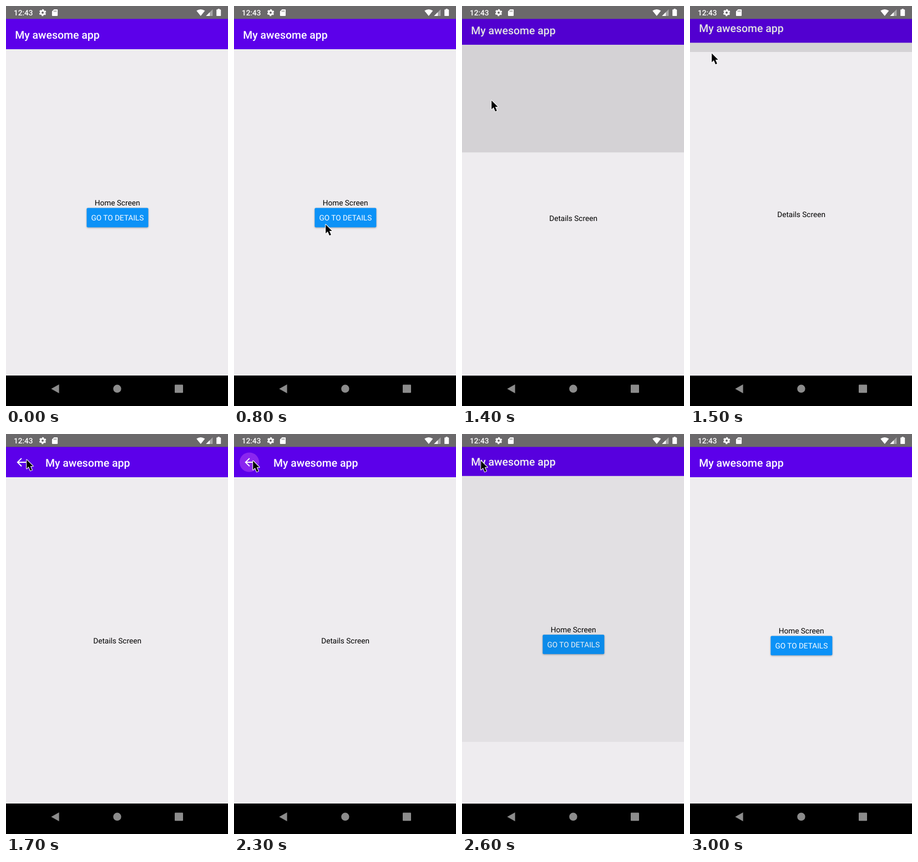
An HTML page that plays this animation: 400x722 px, repeating every 3400 ms.

```html
<!DOCTYPE html>
<html lang="en">
<head>
<meta charset="utf-8">
<title>Screen transition</title>
<style>
  html, body { margin: 0; width: 100%; height: 100%; overflow: hidden; background: #000; }
  svg { display: block; width: 100vw; height: 100vh; }
  text { font-family: Roboto, "Noto Sans", sans-serif; font-size: 13.62px; text-rendering: geometricPrecision; }
  .title { font-size: 19.46px; font-weight: 500; fill: #fff; }
  .mid { text-anchor: middle; }
  .button { filter: drop-shadow(0 1.5px 1.5px rgba(0, 0, 0, .32)); }
</style>
</head>
<body>
<svg viewBox="0 0 400 722">
  <defs>
    <clipPath id="reveal"><rect id="window" width="400" height="644"/></clipPath>
    <clipPath id="buttonClip"><rect x="145.4" y="364.6" width="111" height="34.8" rx="2"/></clipPath>
    <g id="base">
      <rect y="23" width="400" height="644" fill="#eeecef"/>
      <rect y="23" width="400" height="55" fill="#5c00ea"/>
    </g>
  </defs>

  <rect y="23" width="400" height="644" fill="#eeecef"/>

  <g id="home">
    <use href="#base"/>
    <text class="title" x="16.2" y="58.8">My awesome app</text>
    <text class="mid" x="200.6" y="360.4">Home Screen</text>
    <rect class="button" x="145.4" y="364.6" width="111" height="34.8" rx="2" fill="#0c92f7"/>
    <g clip-path="url(#buttonClip)"><circle id="tap" cx="165" cy="394"/></g>
    <text class="mid" x="200.9" y="387.2" fill="#fff">GO TO DETAILS</text>
    <rect id="scrim" y="23" width="400" height="644"/>
  </g>

  <g id="details" clip-path="url(#reveal)">
    <g id="card">
      <use href="#base"/>
      <circle id="halo" cx="27.6" cy="51" fill="#8b26ef"/>
      <path d="M36 51H21.5M28 43.8L20.8 51L28 58.2" fill="none" stroke="#fff" stroke-width="1.9"/>
      <text class="title" x="70.9" y="58.8">My awesome app</text>
      <text class="mid" x="200.6" y="378.2">Details Screen</text>
    </g>
  </g>

  <rect width="400" height="23.3" fill="#6b696b"/>
  <g fill="#fff">
    <text x="14" y="17" font-weight="500">12:43</text>
    <g fill="none" stroke="#fff">
      <circle cx="66" cy="12" r="3.4" stroke-width="2.8"/>
      <circle cx="66" cy="12" r="5.2" stroke-width="2.2" stroke-dasharray="3 2.445" stroke-dashoffset="4.22"/>
    </g>
    <path d="M86.6 6H92a1.1 1.1 0 0 1 1.1 1.1V16.9A1.1 1.1 0 0 1 92 18H84a1.1 1.1 0 0 1-1.1-1.1V9.7Z"/>
    <path d="M86.4 8.4v2.2M88.4 8v2.6M90.4 8v2.6" stroke="#6b696b" stroke-width=".9"/>
    <path d="M343.2 8.6Q350.8 3.2 358.4 8.6L350.8 18Z"/>
    <path d="M372.4 6V18H360.4Z" opacity=".4"/>
    <path d="M367.2 11.2V18H360.4Z"/>
    <path d="M381.7 5h3v1.3h1.6a.9.9 0 0 1 .9.9V17.2a.9.9 0 0 1-.9.9h-6.2a.9.9 0 0 1-.9-.9V7.2a.9.9 0 0 1 .9-.9h1.6Z"/>
  </g>

  <rect y="667.2" width="400" height="54.8"/>
  <g fill="#8c8c8c">
    <path d="M81.4 691L95.6 683V699Z"/>
    <circle cx="200.4" cy="690.8" r="7.2"/>
    <rect x="304" y="683.6" width="15" height="14.6" rx="1"/>
  </g>

  <g id="cursor">
    <path d="M1 1.5V18.8L5 15L8.3 22.8L11.5 21.4L8.2 13.8H13.4Z" transform="translate(.3 .2) scale(.92)"
      stroke="#fff" stroke-width="2.2" stroke-linejoin="round" paint-order="stroke"/>
  </g>
</svg>
<script>
const LOOP = 3400, STEP = 100, TOP = 23, HEIGHT = 644, SLIDE = 425;
const OPEN = 1321, CLOSE = 2466;
const $ = id => document.getElementById(id);
const clamp = v => Math.min(1, Math.max(0, v));
const ramp = (t, from, to) => clamp((t - from) / (to - from));
const set = (id, attrs) => {
  for (const name in attrs) $(id).setAttribute(name, attrs[name]);
};

// Cubic bezier (0.20833, 0.82, 0.25, 1)
function ease(x) {
  const curve = (s, a, b) => 3 * (1 - s) ** 2 * s * a + 3 * (1 - s) * s * s * b + s ** 3;
  let lo = 0, hi = 1;
  for (let i = 0; i < 30; i++) {
    const s = (lo + hi) / 2;
    if (curve(s, 0.20833, 0.25) < x) lo = s; else hi = s;
  }
  return curve(lo, 0.82, 1);
}

// Pointer stops: time, x, y
const stops = [
  [100, 122, 515], [300, 146, 436], [500, 162, 398], [600, 164, 393], [1100, 164, 393],
  [1200, 158, 384], [1300, 112, 292], [1400, 52, 169], [1500, 38, 84],
  [1600, 36, 52], [1700, 36, 45], [1900, 36, 45], [2100, 33, 47],
  [2600, 33, 47], [2700, 32, 44], [2800, 28, 28], [2900, 23, 8]
];

function pointer(t) {
  const next = stops.findIndex(stop => stop[0] >= t);
  if (next < 0 || t < stops[0][0]) return null;
  const b = stops[next], a = stops[next - 1] || b;
  const k = a === b ? 0 : ramp(t, a[0], b[0]);
  return [a[1] + (b[1] - a[1]) * k, a[2] + (b[2] - a[2]) * k];
}

function draw(t) {
  const p = ease(ramp(t, OPEN, OPEN + SLIDE)) - ease(ramp(t, CLOSE, CLOSE + SLIDE));
  const drop = HEIGHT * (1 - p);
  set("home", { transform: `translate(0 ${-0.02 * HEIGHT * p})` });
  set("scrim", { opacity: 0.108 * clamp(p / 0.36) });
  set("details", { visibility: p > 0 ? "visible" : "hidden" });
  set("window", { y: TOP + drop });
  set("card", { transform: `translate(0 ${0.041 * drop})` });

  set("tap", { r: 100 * ramp(t, 950, 1200), opacity: 0.12 * (1 - ramp(t, 1200, 1400)) });
  set("halo", { r: 17.6 * ramp(t, 2100, 2300), opacity: 1 - ramp(t, 2400, 2600) });

  const at = pointer(t);
  set("cursor", at
    ? { visibility: "visible", transform: `translate(${at[0]} ${at[1]})` }
    : { visibility: "hidden" });
}

let start;
function tick(now) {
  start ??= now;
  draw(Math.floor(((now - start) % LOOP) / STEP) * STEP);
  requestAnimationFrame(tick);
}
draw(0);
requestAnimationFrame(tick);
</script>
</body>
</html>
```
